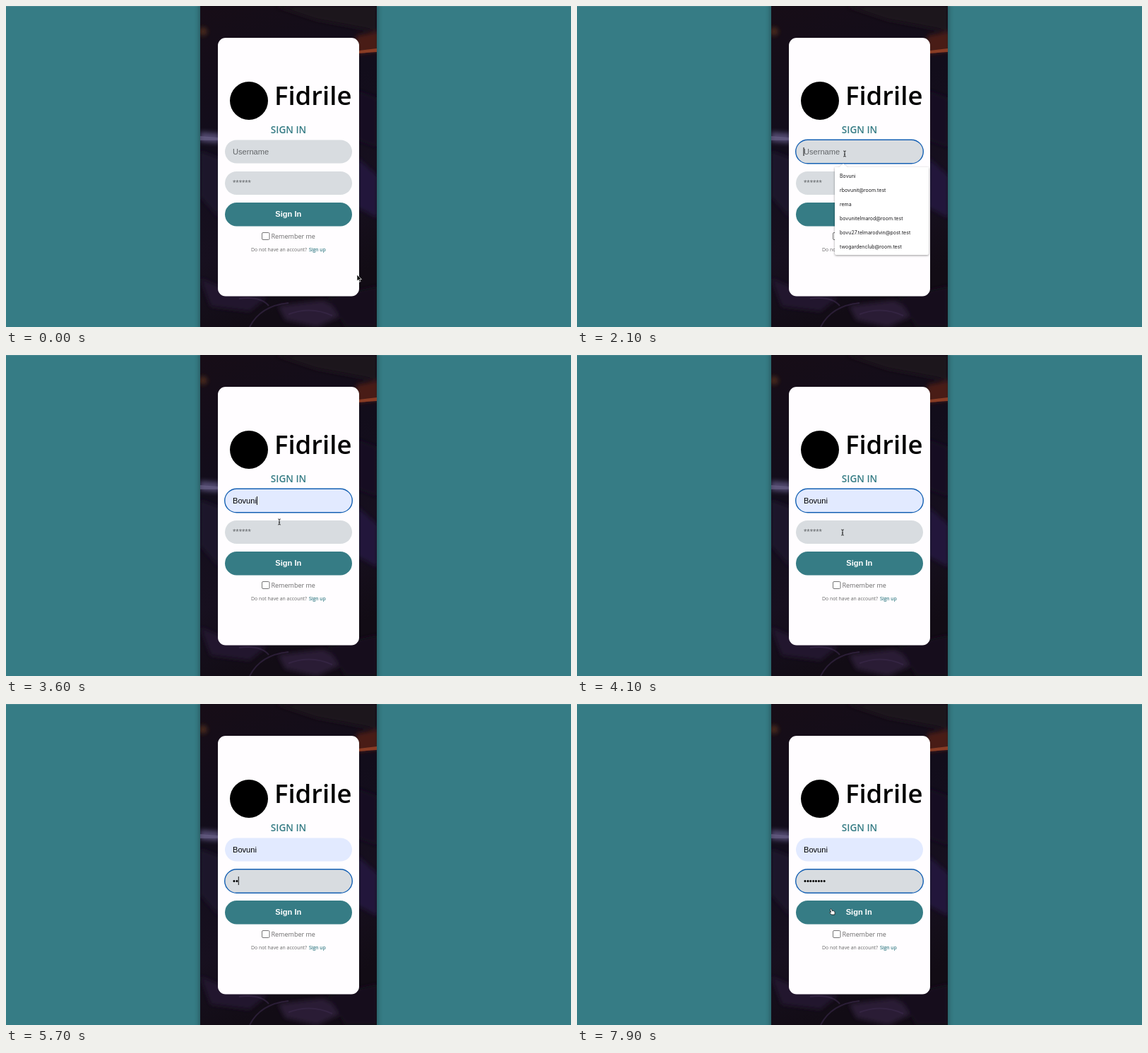
Recreate the animation shown at these times as an HTML page. Size 800 px wide and 454 px high, loop 8 s.

```html
<!DOCTYPE html>
<html lang="en">
<head>
<meta charset="utf-8">
<title>Sign in</title>
<style>
  html, body { margin: 0; width: 100%; height: 100%; overflow: hidden; background: #367c85; }
  svg { display: block; width: 100vw; height: 100vh; }
  text { white-space: pre; }
  .field { font: 11.1px "Liberation Sans", Arial, sans-serif; }
  .hint { fill: #626568; }
  .body { font-family: "Open Sans", "Noto Sans", sans-serif; }
  .menu { font-family: Inter, Roboto, sans-serif; }
  .ring { fill: none; stroke: #1560b3; stroke-width: 1.4; }
  .float { filter: drop-shadow(0 1px 1.5px rgba(0, 0, 0, .4)); }
</style>
</head>
<body>
<svg viewBox="0 0 800 454">
  <defs>
    <linearGradient id="night" x2="0.25" y2="1">
      <stop offset="0" stop-color="#170d17"/>
      <stop offset=".4" stop-color="#120d1b"/>
      <stop offset=".75" stop-color="#17101f"/>
      <stop offset="1" stop-color="#120c15"/>
    </linearGradient>
    <filter id="soft" x="-50%" y="-50%" width="200%" height="200%"><feGaussianBlur stdDeviation="3"/></filter>
    <filter id="edge" x="-10%" width="120%"><feGaussianBlur stdDeviation="4"/></filter>
    <clipPath id="column"><rect x="275" width="250" height="454"/></clipPath>
  </defs>

  <rect width="800" height="454" fill="#367c85"/>
  <rect width="800" height="1" fill="#4b8992"/>
  <rect x="275" y="-20" width="250" height="494" fill="#000" opacity=".4" filter="url(#edge)"/>

  <g clip-path="url(#column)">
    <rect x="275" width="250" height="454" fill="url(#night)"/>
    <g filter="url(#soft)">
      <circle cx="279" cy="36" r="6" fill="#4a2a1c"/>
      <path d="M380 0H525V36L440 20Z" fill="#1f121a"/>
      <path d="M496 42L528 36V64L496 68Z" fill="#4a1c18"/>
      <path d="M275 178L302 180V194L275 192Z" fill="#50476c"/>
      <path d="M275 205L302 215V300L275 270Z" fill="#1c1329"/>
      <path d="M498 215L526 240V300L498 285Z" fill="#21173a"/>
      <path d="M498 120L526 130V200L498 190Z" fill="#160f20"/>
      <path d="M275 385L310 400L370 412L345 432L290 425Z" fill="#24182f"/>
      <path d="M385 424L450 416L480 436L440 454L395 444Z" fill="#2a1c36"/>
      <path d="M455 412L526 396V454H480Z" fill="#15101c"/>
    </g>
    <path d="M500 63L525 60V65L500 67Z" fill="#8a3d25"/>
    <path d="M275 184L300 186V190L275 190Z" fill="#6b6288" opacity=".6"/>
    <path d="M330 414Q360 410 372 424M400 436Q432 424 462 438M345 454Q360 424 400 420" fill="none" stroke="#3b2a4c" stroke-width="2" opacity=".6"/>
  </g>

  <rect x="300" y="45" width="200" height="365.500" rx="11" fill="#fffdff"/>
  <circle cx="344" cy="134" r="27" fill="#000"/>
  <text class="body" x="380" y="140" font-size="36.500" font-weight="600">Fidrile</text>
  <text class="body" x="400" y="180" font-size="13.600" font-weight="600" fill="#367c85" text-anchor="middle">SIGN IN</text>

  <rect id="userBox" x="310" y="189.500" width="180" height="33" rx="16.500"/>
  <rect id="userRing" class="ring" x="309.700" y="189.200" width="180.600" height="33.600" rx="16.800"/>
  <text id="user" class="field" x="321" y="209.500"></text>

  <rect x="310" y="234" width="180" height="33" rx="16.500" fill="#d8dce0"/>
  <rect id="passRing" class="ring" x="309.700" y="233.700" width="180.600" height="33.600" rx="16.800"/>
  <text id="pass" class="field" x="321" y="254"></text>
  <rect id="caret" width="1" height="12" fill="#111"/>

  <rect x="310" y="278" width="180" height="33.500" rx="16.700" fill="#367c85"/>
  <text id="signIn" class="field" y="298" font-weight="700" fill="#fff" text-anchor="middle" style="font-weight:700">Sign In</text>
  <rect x="362.500" y="320.500" width="10.500" height="10" rx="1.500" fill="#fff" stroke="#767676"/>
  <text class="body" x="375.500" y="329" font-size="9" fill="#686868">Remember me</text>
  <text class="body" x="347" y="347" font-size="6.900" fill="#686868">Do not have an account?</text>
  <text class="body" x="429" y="347" font-size="6.900" fill="#367c85" stroke="#367c85" stroke-width=".15">Sign up</text>

  <g id="menu" class="menu">
    <path class="float" d="M365 228H371L377 223L383 228H498V350Q498 352 496 352H367Q365 352 365 350Z" fill="#fff"/>
    <rect id="hover" x="365" y="230" width="133" height="20" fill="#e8e8e9"/>
    <g id="items" font-size="7" fill="#1c1c1e"></g>
  </g>

  <g id="notice" class="menu">
    <rect class="float" x="365" y="272" width="186.500" height="24.500" rx="2" fill="#fff"/>
    <circle cx="376.300" cy="284.500" r="4.500" fill="#4285f4"/>
    <text x="387" y="287" font-size="7" fill="#55585c">Use passwords saved in your Vorlen Account</text>
  </g>

  <g id="pointer">
    <path id="arrow" d="M0 0V9L2.100 7.100L3.500 10.300L5 9.600L3.600 6.500H6.500Z" fill="#000" stroke="#fff" stroke-width=".7"/>
    <path id="beam" d="M-1.800 -4Q0 -4 0 -3Q0 -4 1.800 -4M0 -3V3M-1.800 4Q0 4 0 3Q0 4 1.800 4M-.8 .8H.8" fill="none" stroke="#111" stroke-width=".9"/>
    <path id="hand" d="M-2 -4Q-1 -4.700 -.5 -3.500L.3 -1.300Q2.600 -1.900 3.700 -.6Q4.600 1 3.800 4H-.6L-3.500 1Q-3.500 -.3 -1.400 .6L-2.500 -2.800Q-2.700 -3.600 -2 -4Z" fill="#fff" stroke="#111" stroke-width=".8"/>
  </g>
</svg>

<script>
const LOOP = 8000, STEP = 100;
const NAME = "Bovuni";
const entries = [NAME, "rbovunit@room.test", "rema", "bovunitelmarod@room.test",
  "bovu27.telmarodvin@post.test", "twogardenclub@room.test"];

// Moments of the session, in ms
const userFocus = 2100, hoverAt = 3100, picked = 3400, passFocus = 4200, mouseBack = 7300;
const keys = [5300, 5600, 5900, 6200, 6450, 6700, 7000, 7200];

// Pointer stops: time, x, y
const path = [
  [0, 497, 380], [200, 497, 380], [1100, 379, 209], [2900, 379, 209],
  [3200, 386, 239], [3400, 386, 239], [3600, 387, 236], [4100, 376, 251],
  [7200, 376, 251], [7700, 361, 294], [LOOP, 361, 294]
];

const $ = id => document.getElementById(id);
const show = (id, on) => $(id).setAttribute("visibility", on ? "visible" : "hidden");
const between = (t, a, b) => t >= a && t < b;
const ease = k => k * k * (3 - 2 * k);

entries.forEach((entry, i) => {
  const line = document.createElementNS("http://www.w3.org/2000/svg", "text");
  line.setAttribute("x", 372);
  line.setAttribute("y", 242.5 + 20 * i);
  line.textContent = entry;
  $("items").append(line);
});

function pointerAt(t) {
  const i = path.findIndex(p => p[0] > t);
  const [t0, x0, y0] = path[i - 1], [t1, x1, y1] = path[i];
  const k = ease((t - t0) / (t1 - t0));
  return [x0 + (x1 - x0) * k, y0 + (y1 - y0) * k];
}

function pointerKind(x, y, menuOpen) {
  if (menuOpen && x > 365 && y > 228) return "arrow";
  if (x < 310 || x > 490) return "arrow";
  if (between(y, 189, 223) || between(y, 234, 267)) return "beam";
  return between(y, 278, 312) ? "hand" : "arrow";
}

function setField(id, value, hint) {
  $(id).textContent = value || hint;
  $(id).classList.toggle("hint", !value);
}

function draw(t) {
  const filled = t >= hoverAt;
  const menuOpen = between(t, userFocus, picked);
  const typed = keys.filter(k => k <= t);
  const onUser = between(t, userFocus, passFocus), onPass = t >= passFocus;

  setField("user", filled ? NAME : "", "Username");
  setField("pass", "•".repeat(typed.length), "******");
  $("userBox").setAttribute("fill", filled ? "#e2eaff" : "#d8dce0");
  show("userRing", onUser);
  show("passRing", onPass);
  show("menu", menuOpen);
  $("hover").setAttribute("opacity", filled ? 1 : 0);
  show("notice", between(t, passFocus + 100, keys[0]));

  const since = Math.max(...[userFocus, picked, passFocus, ...typed].filter(k => k <= t));
  const empty = onPass ? !typed.length : t < picked;
  const end = empty ? 0 : $(onPass ? "pass" : "user").getComputedTextLength();
  show("caret", (onUser || onPass) && (t - since) % 1000 < 500);
  $("caret").setAttribute("x", 321 + end - (empty ? 0.5 : 0));
  $("caret").setAttribute("y", onPass ? 244 : 200);

  const [x, y] = pointerAt(t);
  const kind = pointerKind(x, y, menuOpen);
  const hidden = between(t, keys[0], mouseBack);
  $("pointer").setAttribute("transform", `translate(${x} ${y})`);
  for (const id of ["arrow", "beam", "hand"]) show(id, id === kind && !hidden);
  $("signIn").setAttribute("x", kind === "hand" ? 399.2 : 399.8);
}

const start = performance.now();
function tick() {
  const t = (performance.now() - start) % LOOP;
  draw(Math.floor(t / STEP) * STEP);
  requestAnimationFrame(tick);
}
tick();
</script>
</body>
</html>
```
